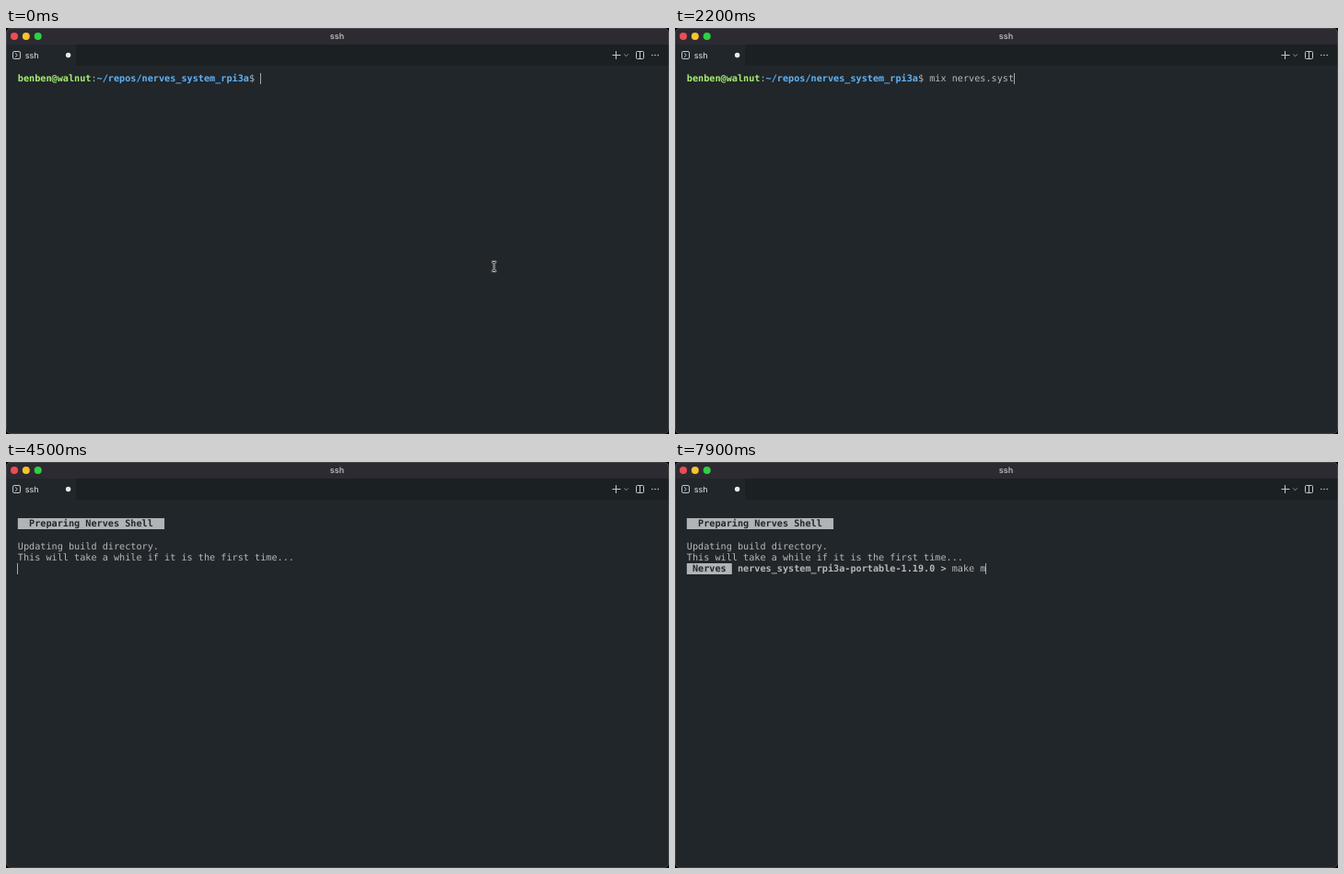
These frames come from a looping animation (720x441 px, 8 s). An HTML page with a canvas:

```html
<!DOCTYPE html>
<html lang="en">
<head>
<meta charset="utf-8">
<title>Terminal</title>
<style>
  html, body { margin: 0; width: 100%; height: 100%; overflow: hidden; background: #000; }
  canvas { display: block; width: 720px; height: 441px; }
</style>
</head>
<body>
<canvas id="stage" width="720" height="441"></canvas>
<script>
const ctx = document.getElementById('stage').getContext('2d');
const LOOP = 8000;
const LEFT = 12.8, BASELINE = 58, CELL = 6.125, ROW = 12.25;
const MONO = '"DejaVu Sans Mono", monospace';
const UI = 'Inter, sans-serif';
const BG = '#21262a', TEXT = '#b6b9bb', GREEN = '#a6ef72', BLUE = '#60b3f8', LABEL = '#b0b4b7';

const COMMAND = 'mix nerves.system.shell';
const COMMAND_KEYS = [300, 400, 500, 600, 800, 900, 1100, 1200, 1400, 1600, 1700, 1800,
  1900, 2000, 2200, 2400, 2800, 2900, 3100, 3200, 3300, 3500, 3600];
const ENTER = 3800, COMPILE = 4300, CLEAR = 4500, READY = 4700;
const MAKE = 'make m';
const MAKE_KEYS = [6900, 7000, 7200, 7500, 7700, 7900];

const typed = (text, keys, t) => text.slice(0, keys.filter(k => k <= t).length);

function rect(x, y, w, h, color) {
  ctx.fillStyle = color;
  ctx.fillRect(x, y, w, h);
}

function disc(x, y, r, color) {
  ctx.fillStyle = color;
  ctx.beginPath();
  ctx.arc(x, y, r, 0, Math.PI * 2);
  ctx.fill();
}

function line(color, width, ...points) {
  ctx.strokeStyle = color;
  ctx.lineWidth = width;
  ctx.beginPath();
  points.forEach(([x, y], i) => i ? ctx.lineTo(x, y) : ctx.moveTo(x, y));
  ctx.stroke();
}

function box(x, y, w, h, r, color) {
  ctx.strokeStyle = color;
  ctx.lineWidth = 1;
  ctx.beginPath();
  ctx.roundRect(x, y, w, h, r);
  ctx.stroke();
}

// Prints on the character grid and returns the next free column.
function print(text, col, row, color = TEXT, bold = false) {
  ctx.font = `${bold ? 'bold ' : ''}10.17px ${MONO}`;
  ctx.textAlign = 'left';
  ctx.fillStyle = color;
  [...text].forEach((c, i) => {
    if (c !== ' ') ctx.fillText(c, LEFT + (col + i) * CELL, BASELINE + row * ROW);
  });
  return col + text.length;
}

function printLabel(text, row) {
  rect(LEFT, Math.round(48.5 + row * ROW), text.length * CELL, 12, LABEL);
  return print(text, 0, row, BG, true);
}

function caret(col, row) {
  rect(Math.floor(LEFT + col * CELL), Math.round(48.5 + row * ROW), 1, 12, '#a4a7a9');
}

function uiText(text, x, y, align, weight, color) {
  ctx.font = `${weight} 9px ${UI}`;
  ctx.textAlign = align;
  ctx.fillStyle = color;
  ctx.fillText(text, x, y);
}

function drawWindow() {
  rect(0, 0, 720, 441, BG);
  rect(0, 0, 720, 18, '#2c2b31');
  rect(0, 18, 720, 23, '#1b2022');
  rect(0, 18, 76, 23, BG);
  disc(9, 9, 4, '#ee4b55');
  disc(21.8, 9, 4, '#f8c32c');
  disc(34.7, 9, 4, '#2fd043');
  uiText('ssh', 359.5, 12, 'center', 600, '#b9b8bd');

  const icon = '#c3c6c8';
  box(7.5, 25.5, 8, 8, 1.5, icon);
  line(icon, 1, [10, 27.3], [12.3, 29.5], [10, 31.7]);
  uiText('ssh', 20.7, 32.5, 'left', 400, '#e6e7e8');
  disc(67.6, 29.5, 2.7, '#e8e9ea');

  line(icon, 1, [658.5, 29.5], [667.5, 29.5]);
  line(icon, 1, [662.5, 25], [662.5, 34]);
  line('#989c9e', 1, [671.3, 28.5], [673.5, 30.7], [675.7, 28.5]);
  box(684.5, 25.5, 8, 8, 1, icon);
  line(icon, 1, [688.5, 25.5], [688.5, 33.5]);
  [701.8, 705, 708.2].forEach(x => disc(x, 29.5, 0.8, icon));
}

function drawPointer(x, y) {
  const beam = (color, width) => {
    line(color, width, [x - 2.5, y - 5], [x - 1, y - 5], [x, y - 4], [x + 1, y - 5], [x + 2.5, y - 5]);
    line(color, width, [x - 2.5, y + 5], [x - 1, y + 5], [x, y + 4], [x + 1, y + 5], [x + 2.5, y + 5]);
    line(color, width, [x, y - 4], [x, y + 4]);
  };
  beam('#c9cbcc', 2.4);
  beam('#15181a', 0.9);
}

function drawPrompt(t) {
  let col = print('benben@walnut', 0, 0, GREEN, true);
  col = print(':', col, 0);
  col = print('~/repos/nerves_system_rpi3a', col, 0, BLUE, true);
  col = print('$ ', col, 0);
  col = print(typed(COMMAND, COMMAND_KEYS, t), col, 0);
  if (t < ENTER) caret(col, 0);
  else if (t < COMPILE) caret(0, 1);
  else {
    print('==> nerves', 0, 1);
    caret(0, 2);
  }
  if (t < COMMAND_KEYS[0]) drawPointer(530, 259);
}

function drawShell(t) {
  printLabel('  Preparing Nerves Shell  ', 1);
  print('Updating build directory.', 0, 3);
  print('This will take a while if it is the first time...', 0, 4);
  if (t < READY) return caret(0, 5);
  let col = printLabel(' Nerves ', 5);
  col = print(' nerves_system_rpi3a-portable-1.19.0 > ', col, 5, TEXT, true);
  col = print(typed(MAKE, MAKE_KEYS, t), col, 5);
  caret(col, 5);
}

function draw(t) {
  ctx.clearRect(0, 0, 720, 441);
  ctx.save();
  ctx.textRendering = 'geometricPrecision';
  ctx.beginPath();
  ctx.roundRect(0, 0, 720, 441, 5);
  ctx.clip();
  drawWindow();
  (t < CLEAR ? drawPrompt : drawShell)(t);
  ctx.restore();
  box(0.5, 0.5, 719, 440, 5, 'rgba(130, 136, 140, 0.28)');
}

const start = performance.now();
function tick() {
  draw((performance.now() - start) % LOOP);
  requestAnimationFrame(tick);
}
tick();
</script>
</body>
</html>
```
